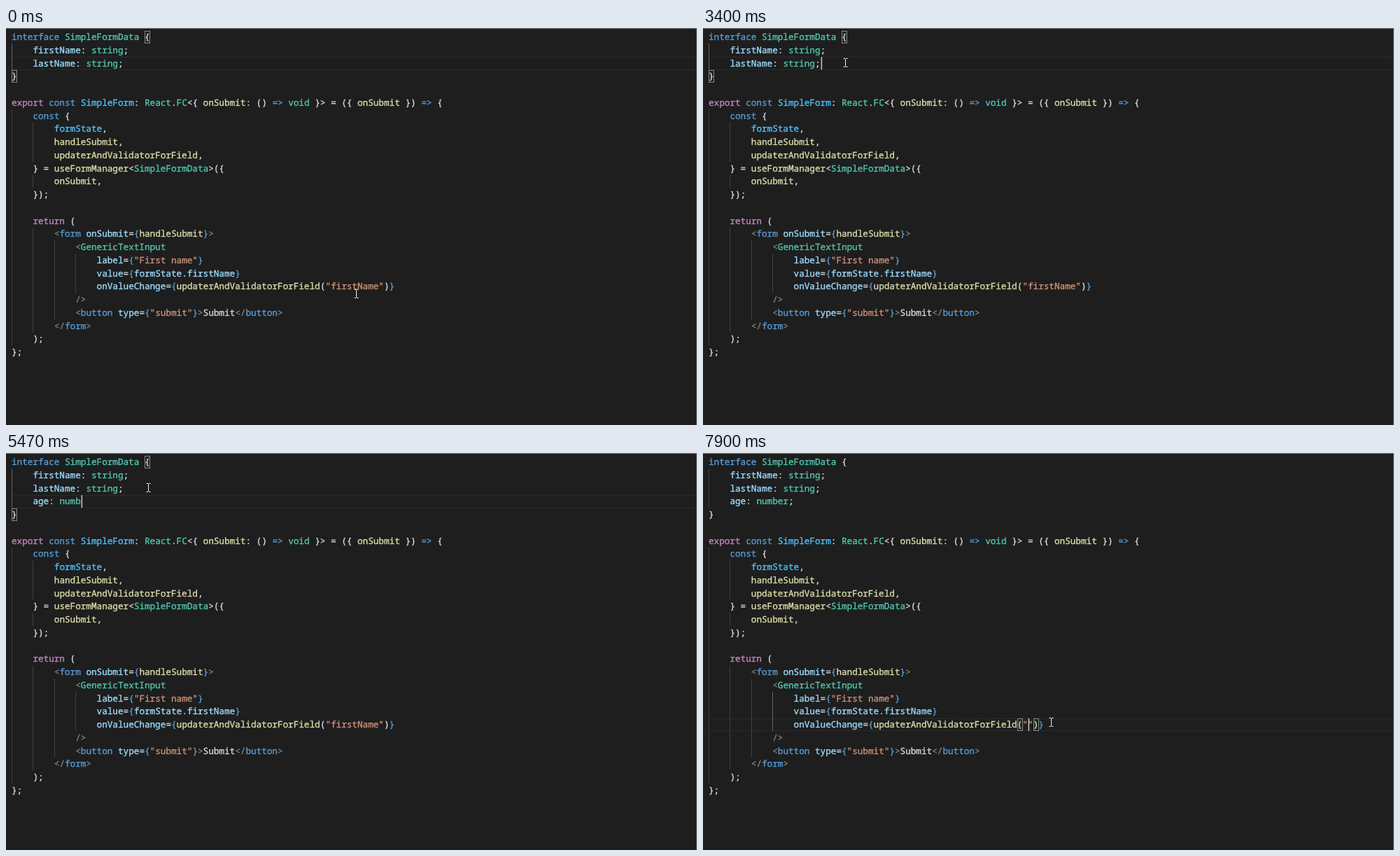
An HTML page that plays this animation: 987x567 px, repeating every 8 s.

```html
<!DOCTYPE html>
<html lang="en">
<head>
<meta charset="utf-8">
<title>Typed form fields</title>
<style>
html, body { margin: 0; width: 100%; height: 100%; overflow: hidden; background: #1e1e1e; }
svg { display: block; width: 987px; height: 567px; }
text { font: 12.667px "Noto Sans Mono", monospace; white-space: pre; text-rendering: geometricPrecision; stroke-width: .35px; }
.bold { font-weight: 700; stroke: none; }
</style>
</head>
<body>
<svg id="stage" viewBox="0 0 987 567"></svg>
<script>
const LOOP = 8000, LEFT = 8, TOP = 3.5, CW = 7.6, LH = 18.75;
const stage = document.getElementById('stage');

// "@x" switches to colour x inside a line of code
const COLORS = {
  b: '#569cd6', t: '#4ec9b0', p: '#9cdcfe', c: '#4fc1ff', k: '#c586c0',
  f: '#dcdcaa', s: '#ce9178', g: '#808080', w: '#d8d8d8', h: '#40a6ff'
};
const HEAD = [
  '@binterface @tSimpleFormData @w{',
  '    @pfirstName@w: @tstring@w;',
  '    @plastName@w: @tstring@w;'
];
const BODY = arg => [
  '@w}',
  '',
  '@kexport @bconst @cSimpleForm@w: @tReact@w.@tFC@w<{ @fonSubmit@w: () @b=> @tvoid @w}> = ({ @fonSubmit @w}) @b=> @w{',
  '    @bconst @w{',
  '        @cformState@w,',
  '        @fhandleSubmit@w,',
  '        @fupdaterAndValidatorForField@w,',
  '    @w} = @fuseFormManager@w<@tSimpleFormData@w>({',
  '        @fonSubmit@w,',
  '    @w});',
  '',
  '    @kreturn @w(',
  '        @g<@bform @ponSubmit@w=@b{@fhandleSubmit@b}@g>',
  '            @g<@tGenericTextInput',
  '                @plabel@w=@b{@s"First name"@b}',
  '                @pvalue@w=@b{@pformState@w.@pfirstName@b}',
  `                @ponValueChange@w=@b{@fupdaterAndValidatorForField@w(@s"${arg}"@w)@b}`,
  '            @g/>',
  '            @g<@bbutton @ptype@w=@b{@s"submit"@b}@g>@wSubmit@g</@bbutton@g>',
  '        @g</@bform@g>',
  '    @w);',
  '@w};'
];
const FIELDS = ['firstName', 'lastName'];
const GLOBALS = ['Im@age', 'Im@ageBitmap', 'Im@ageBitmapRenderingContext', 'Im@ageData',
  'Mess@ageChannel', 'Mess@ageEvent', 'Mess@agePort', 'P@ageTransitionEvent',
  'Stor@age', 'Stor@ageEvent', 'Stor@ageManager', 'HTMLIm@ageElement'];
const NUMBERS = ['@number', '@Number', '@NumberConstructor', 'SVGAnimated@Number', 'SVGAnimated@NumberList'];

const colX = c => LEFT + CW * c;
const rowY = r => TOP + LH * r;
const rect = (x, y, w, h, fill, more = '') =>
  `<rect x="${x}" y="${y}" width="${w}" height="${h}" fill="${fill}" ${more}/>`;
const line = (d, color, w = 1) => `<path d="${d}" fill="none" stroke="${color}" stroke-width="${w}"/>`;
const escape = s => s.replace(/&/g, '&amp;').replace(/</g, '&lt;').replace(/>/g, '&gt;');
const word = (x, y, s, color, bold) =>
  `<text x="${x}" y="${Math.round(y)}" fill="${color}" stroke="${color}"${bold ? ' class="bold"' : ''}>${escape(s)}</text>`;

function codeLine(src, row) {
  let col = 0, out = '';
  src.split('@').forEach((part, i) => {
    const s = i ? part.slice(1) : part;
    if (s.trim()) out += word(colX(col), rowY(row) + 13.6, s, COLORS[part[0]]);
    col += s.length;
  });
  return out;
}

function icon(kind, x, y) {
  if (kind === 'field')
    return rect(x + .5, y - 4.5, 13, 9, 'none', 'rx="1.5" stroke="#d4d4d4" stroke-width="1.2"') +
      line(`M${x + 3} ${y - 1.5}h8M${x + 3} ${y + 1.5}h8`, '#d4d4d4');
  if (kind === 'keyword')
    return line(`M${x} ${y - 5}h8m2 0h4M${x} ${y - 2}h4m2 0h6M${x} ${y + 1}h9m2 0h3M${x} ${y + 4}h6m2 0h6`, '#e0e0e0', 1.6);
  if (kind === 'interface')
    return `<circle cx="${x + 2}" cy="${y}" r="2" fill="#75beff"/><circle cx="${x + 11}" cy="${y}" r="2.8" fill="none" stroke="#75beff" stroke-width="1.2"/>` +
      line(`M${x + 3} ${y}h5`, '#75beff', 1.2);
  return line(`M${x + 3} ${y - 4}h-2.5v8h2.5M${x + 11} ${y - 4}h2.5v8h-2.5`, '#c5c5c5') +
    line(`M${x + 4} ${y}l3 -2.5 3 1.5v2l-3 2 -3 -1.5zl3 1 3 -2`, '#75beff', 1.2);
}

function iconKind(items, i) {
  if (items === FIELDS) return 'field';
  if (items === NUMBERS && !i) return 'keyword';
  return items[i].endsWith('Constructor') ? 'interface' : 'variable';
}

function popup(items, pick, row, col) {
  const x = Math.round(colX(col)) + .5, y = Math.round(rowY(row + 1)) + .5;
  let out = rect(x, y, 438, items.length * LH + 2.5, '#252526', 'stroke="#454545"');
  items.forEach((item, i) => {
    const top = y + .5 + i * LH, mid = top + 9.5;
    if (i === pick) out += rect(x + .5, top, 437, LH, '#204870');
    out += icon(iconKind(items, i), x + 3, mid);
    const [before, rest] = item.split('@');
    const n = items === NUMBERS ? 6 : 3;
    const parts = rest === undefined ? [before] : [before, rest.slice(0, n), rest.slice(n)];
    let px = x + 21.5;
    parts.forEach((s, k) => {
      if (s) out += word(px, mid + 4.2, s, k === 1 ? COLORS.h : i === pick ? '#fff' : '#d4d4d4', k === 1 || (i === pick && k === 0));
      px += s.length * CW;
    });
  });
  return out;
}

function guides(shift, pair) {
  const bar = (col, from, to, on) =>
    rect(Math.round(colX(col)), rowY(from), 1, (to - from + 1) * LH, on ? '#646464' : '#404040');
  const s = shift;
  return bar(0, 1, 2 + s, pair === 'block') + bar(0, 6 + s, 23 + s) + bar(4, 7 + s, 9 + s) +
    bar(4, 11 + s, 11 + s) + bar(4, 15 + s, 22 + s) + bar(8, 16 + s, 21 + s) + bar(12, 17 + s, 19 + s, pair === 'call');
}

function pointer([x, y], arrow) {
  if (arrow)
    return `<path d="M${x} ${y}v15l3.5 -3.3 2.4 5.3 2.4 -1.1 -2.3 -5.1h4.8z" fill="#fff" stroke="#222" stroke-width=".7"/>`;
  const cx = Math.round(x) + .5, cy = Math.round(y) - .5;
  return line(`M${cx - 3} ${cy - 6}h2.5m1 0h2.5M${cx} ${cy - 5.5}v11M${cx - 3} ${cy + 6}h2.5m1 0h2.5`, '#f0f0f0');
}

const bracket = (row, col) =>
  rect(Math.round(colX(col)) + .5, Math.round(rowY(row)) + .5, 7, 17, 'rgba(0,100,0,.1)', 'stroke="#888"');

// Timeline: each entry overrides part of the state
const steps = [];
const at = (time, change) => steps.push([time, change]);
const bezier = (a, b, c, u) => a.map((v, i) => v * (1 - u) ** 2 + 2 * b[i] * u * (1 - u) + c[i] * u * u);
const glide = (times, a, b, c) =>
  times.forEach((time, i) => at(time, { mouse: bezier(a, b, c, (i + 1) / times.length) }));
const type = (time, age, more) => at(time, { age, col: 4 + age.length, ...more });

at(0, { age: null, arg: 'firstName', row: 2, col: 21, caret: false, pair: 'block', mouse: [500, 380] });
at(300, { row: 19, col: 65, caret: true, pair: 'call' });
at(440, { sel: true, col: 69 });
at(580, { mouse: [502, 379] });
at(720, { occ: true });
at(1020, { arg: '', sel: false, occ: false, col: 60, pair: '' });
at(1170, { pair: 'call' });
at(1330, { items: FIELDS, pick: 0, mouse: [501, 380], arrow: true });
at(1610, { err: true, caret: false });
at(1730, { pick: 1 });
at(2000, { pick: 0 });
at(2150, { caret: true });
at(2430, { items: null, err: false, arg: 'firstName', col: 69, arrow: false, mouse: [500, 380] });
glide([2830, 2970, 3110, 3260], [500, 380], [330, 190], [203, 50]);
at(3400, { row: 2, col: 21, pair: 'block' });
at(3970, { age: '', row: 3, col: 4 });
type(4400, 'a');
type(4530, 'ag', { items: GLOBALS, pick: 0 });
type(4670, 'age');
type(4950, 'age:', { items: null });
type(5090, 'age: ');
type(5230, 'age: nu');
type(5350, 'age: num');
type(5470, 'age: numb');
type(5600, 'age: numbe');
type(5740, 'age: number', { items: NUMBERS });
type(6040, 'age: number;', { items: null });
glide([6470, 6610, 6750, 6890, 7030], [203, 50], [340, 260], [470, 420]);
at(7165, { mouse: [497, 385] });
at(7300, { row: 20, col: 65, pair: 'call' });
at(7440, { occ: true });
at(7590, { sel: true, col: 69 });
at(7900, { arg: '', sel: false, occ: false, col: 60 });

function stateAt(time) {
  const state = {};
  for (const [start, change] of steps) if (start <= time) Object.assign(state, change);
  return state;
}

function ageLine(s) {
  const [name, kind] = s.split(':');
  if (kind === undefined) return '    @p' + name;
  return `    @p${name}@w:@t${kind.replace(';', '@w;')}`;
}

function draw(s) {
  const shift = s.age === null ? 0 : 1, call = 19 + shift;
  const lines = [...HEAD, ...(shift ? [ageLine(s.age)] : []), ...BODY(s.arg)];
  const mark = (row, col, color) => rect(colX(col), rowY(row), 9 * CW, LH, color);
  let out = rect(0, 0, 987, 567, '#1e1e1e');
  if (!s.sel) {
    out += rect(LEFT, Math.round(rowY(s.row)), 978, 1, '#2b2b2b') +
      rect(LEFT, Math.round(rowY(s.row + 1)) - 1, 978, 1, '#2b2b2b');
  }
  if (s.occ) out += mark(1, 4, '#474747') + mark(call - 1, 33, '#474747') + mark(call, 60, '#474747');
  if (s.sel) out += mark(call, 60, '#264f78');
  out += guides(shift, s.pair);
  if (s.pair === 'block') out += bracket(0, 25) + bracket(3 + shift, 0);
  if (s.pair === 'call') out += bracket(call, 58) + bracket(call, 61 + s.arg.length);
  out += lines.map(codeLine).join('');
  if (s.err) out += line(`M456.5 ${rowY(call) + 17.5}` + 'l2 -2.5 2 2.5'.repeat(4), '#f14c4c', 1.1);
  if (s.caret) out += rect(Math.round(colX(s.col)) + .6, rowY(s.row) + .5, 1.5, 18, '#c8c8c8');
  if (s.items) out += popup(s.items, s.pick, s.row, s.col);
  out += pointer(s.mouse, s.arrow);
  return out + rect(0, 0, 987, 1, '#808080') + rect(986, 0, 1, 567, '#808080');
}

let shown = '';
function frame(now) {
  const picture = draw(stateAt(now % LOOP));
  if (picture !== shown) stage.innerHTML = shown = picture;
  requestAnimationFrame(frame);
}
frame(performance.now());
</script>
</body>
</html>
```
